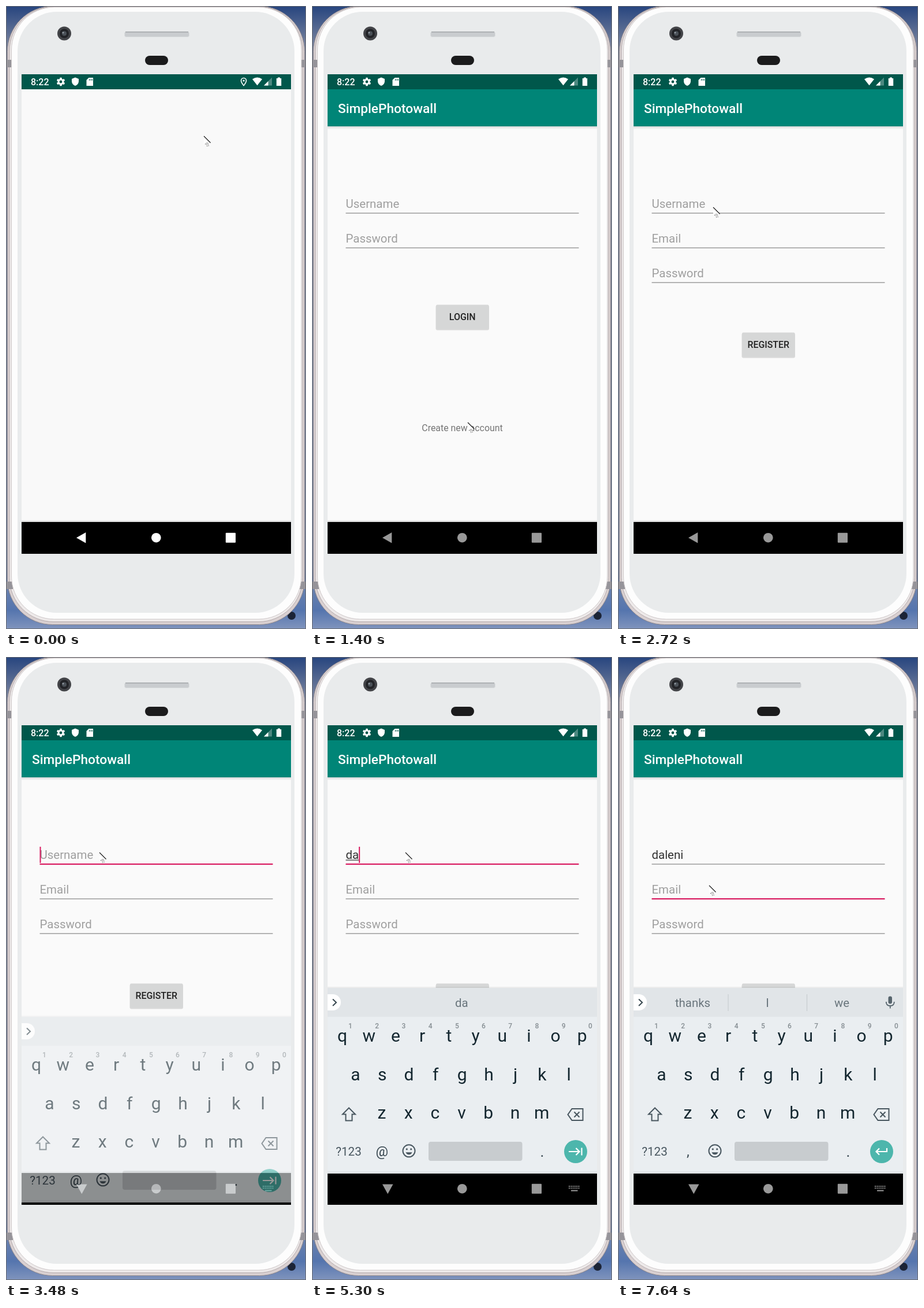
An HTML page that plays this animation: 520 px wide and 1077 px high, repeating every 8 s.

```html
<!DOCTYPE html>
<html lang="en">
<head>
<meta charset="utf-8">
<title>Sign-up screen</title>
<style>
  html, body { margin: 0; width: 100%; height: 100%; overflow: hidden; background: #5a76a8; }
  svg { display: block; width: 100vw; height: 100vh; }
  text { font-family: Roboto, sans-serif; white-space: pre; }
</style>
</head>
<body>
<svg id="stage" viewBox="0 0 520 1077" xmlns="http://www.w3.org/2000/svg"></svg>
<script>
const LOOP = 8000;
const APP = 'SimplePhotowall';
const NAME = 'daleni';
const PINK = '#d81b60', LINE = '#858585', KEY_GREY = '#48565f';
const FIELD_SIZE = 20.45;

const rect = (x, y, w, h, fill, more = '') =>
  `<rect x="${x}" y="${y}" width="${w}" height="${h}" fill="${fill}" ${more}/>`;
const path = (d, fill, more = '') => `<path d="${d}" fill="${fill}" ${more}/>`;
const stroke = (d, color, width = 2, more = '') =>
  path(d, 'none', `stroke="${color}" stroke-width="${width}" ${more}`);
const circle = (x, y, r, fill, more = '') => `<circle cx="${x}" cy="${y}" r="${r}" fill="${fill}" ${more}/>`;
const text = (x, y, s, size, fill, more = '') =>
  `<text x="${x}" y="${y}" font-size="${size}" fill="${fill}" ${more}>${s}</text>`;
const mid = 'text-anchor="middle"', medium = 'font-weight="500"';

const defs = `<defs>
  <linearGradient id="sky" x2="0" y2="1">
    <stop stop-color="#27457f"/><stop offset=".08" stop-color="#8d93a6"/>
    <stop offset=".9" stop-color="#7c8cad"/><stop offset=".97" stop-color="#5575ae"/><stop offset="1" stop-color="#8094bd"/>
  </linearGradient>
  <linearGradient id="shade" x2="0" y2="1">
    <stop stop-color="#000" stop-opacity=".14"/><stop offset="1" stop-color="#000" stop-opacity="0"/>
  </linearGradient>
  <clipPath id="screen"><rect x="27" y="118" width="467" height="829"/></clipPath>
  <clipPath id="reveal"><rect id="revealBox" x="27" y="118" width="467" height="829"/></clipPath>
</defs>`;

function phone() {
  const bands = [93, 995].map(y => rect(0, y, 12, 13, '#96949a') + rect(508, y, 12, 13, '#96949a')).join('');
  return rect(0, 0, 520, 1077, 'url(#sky)') +
    rect(368, 0, 12, 4, '#4a4a50') +
    circle(495, 1054, 7, '#1c2436') +
    rect(2.5, .5, 515, 1069, '#d9d0d1', 'rx="78" stroke="#8e888d"') +
    rect(6, 1.5, 508, 1063, '#eeeaea', 'rx="76" stroke="#b3a9ab"') + bands +
    rect(9.5, 2, 502.5, 1058, '#fdfdfd', 'rx="74" stroke="#cfc9ca"') +
    rect(20, 10, 480, 1039, '#e9ebec', 'rx="68"') +
    circle(101, 47.5, 12, '#434448') + circle(101, 47.5, 8, '#222327') +
    circle(101, 47.5, 4, '#4a5057') + circle(99, 46, 1.5, '#9299a0') +
    rect(205.5, 44.5, 112, 9, '#c9cccf', 'rx="3" stroke="#dcdfe0"') + rect(207, 44, 109, 2, '#aeb1b4') +
    rect(241, 86, 40, 16, '#1b1b1c', 'rx="8"') +
    rect(.5, .5, 519, 1076, 'none', 'stroke="#6b6d72"');
}

const field = (y, label, id = '') =>
  text(58.5, y - 9, label, FIELD_SIZE, '#9f9f9f', id && `id="${id}Hint"`) +
  rect(58.5, y - .5, 404, 1.2, LINE, id && `id="${id}Line"`);

const button = (y, label) =>
  rect(214.5, y + 1, 92.5, 43, '#000', 'rx="3" opacity=".13"') +
  rect(215, y, 91.5, 42, '#d6d7d7', 'rx="2"') +
  text(260.7, y + 26.8, label, 15.9, '#222', `${mid} ${medium}`);

const appWindow = content =>
  rect(27, 144, 467, 748, '#fafafa') + rect(27, 889.5, 467, 2.5, '#e2e2e2') +
  rect(27, 208, 467, 5, 'url(#shade)') +
  rect(27, 78, 467, 66, '#00574b') + rect(27, 144, 467, 64, '#008577') +
  text(45, 185, APP, 22.7, '#fff', medium) + content;

const login = appWindow(
  field(358, 'Username') + field(418, 'Password') + button(516.5, 'LOGIN') +
  text(260.5, 734.5, 'Create new account', 15.9, '#757575', mid));

const register = appWindow(
  field(358, 'Username', 'user') + field(418, 'Email', 'mail') + field(478, 'Password') +
  button(564.5, 'REGISTER') +
  text(58.5, 349, '', FIELD_SIZE, '#303030', 'id="typed"') +
  rect(58.5, 350.5, 0, 1.2, '#303030', 'id="composing"') +
  rect(58.5, 328, 2, 28, PINK, 'id="caret"'));

function statusIcons() {
  const teeth = [0, 60, 120].map(a => rect(93.2, 123.7, 3.6, 14.6, '#fff', `rx="1" transform="rotate(${a} 95 131)"`)).join('');
  return text(43, 137, '8:22', 16, '#fff', medium) +
    teeth + circle(95, 131, 5.4, '#fff') + circle(95, 131, 2.4, '#00574b') +
    path('M120 123.5l6 2.5v4.500q-.5 5.500-6 7.500q-5.500-2-6-7.500v-4.500z', '#fff') +
    path('M143.500 124h7.500v14h-11.500v-10z', '#fff') +
    stroke('M144.500 126v3M147 126v3M149.300 126v3', '#00574b', 1) +
    `<g id="pin">${stroke('M412 137.500q-4.500-5.500-4.500-8.500a4.500 4.500 0 0 1 9 0q0 3-4.500 8.500z', '#fff', 1.6)}${circle(412, 129, 1.6, '#fff')}</g>` +
    path('M427 126.500q8.500-6 17 0l-8.500 10.800z', '#fff') +
    path('M461 123.500v14h-14z', '#fff', 'opacity=".3"') + path('M454.500 130v7.500h-7.500z', '#fff') +
    path('M471 123.500h4v1.500h2.200v13h-8.400v-13h2.200z', '#fff');
}

function navIcons() {
  const dots = [0, 1, 2, 3, 4, 5].map(i =>
    rect(445 + i * 3.3, 914, 1.9, 1.9, '#fff') + rect(445 + i * 3.3, 917.300, 1.9, 1.9, '#fff')).join('');
  return path('M122 919.300L138.300 910v18.500z', '#fff', 'id="back"') +
    circle(260.3, 919.2, 8.3, '#fff') + rect(380.8, 910.8, 17.2, 17, '#fff', 'rx="1"') +
    `<g id="imeIcon">${dots}${rect(449, 921.5, 11.5, 2, '#fff')}</g>`;
}

function keyboard() {
  const row = (letters, x, y) => [...letters].map((c, i) => text(x + i * 46.2, y, c, 30, '#13262f', mid)).join('');
  const hints = [...'1234567890'].map((c, i) => text(66.5 + i * 46.2, 642, c, 12, '#858d92', `${mid} ${medium}`)).join('');
  const word = (x, s) => text(x, 605, s, 20.4, '#69757c', mid);
  return rect(27, 570, 467, 2, '#000', 'opacity=".05"') +
    rect(27, 572, 467, 321, '#eaeef1') + rect(27, 572, 467, 50, '#e1e5e8') +
    rect(27, 889.5, 467, 3, '#dfe3e5') +
    path('M27 583h9a14 14 0 0 1 0 28h-9z', '#fff') +
    stroke('M36 591.500l6 5.700l-6 5.700', '#37474f') +
    text(259.3, 605, '', 20.4, '#69757c', `id="guess" ${mid}`) +
    `<g id="words">${word(129.500, 'thanks')}${word(259, 'I')}${word(388, 'we')}
      ${rect(190.500, 583, 1, 29, '#c3c9cc')}${rect(327, 583, 1, 29, '#c3c9cc')}
      ${rect(468.500, 586.500, 6.500, 13, '#56646c', 'rx="3.2"')}
      ${stroke('M464.800 596q0 7 7 7t7-7M471.800 603v4.500', '#56646c', 1.800)}</g>` +
    row('qwertyuiop', 52.5, 665) + hints + row('asdfghjkl', 75.5, 732) + row('zxcvbnm', 121, 798) +
    stroke('M64 779.500l11 11h-5.500v11h-11v-11h-5.500z', KEY_GREY) +
    stroke('M450.500 781h19v20h-19l-7-10zM454.500 786.500l9 9M463.500 786.500l-9 9', KEY_GREY) +
    text(63.5, 861.5, '?123', 20.6, KEY_GREY, mid) +
    text(121.3, 863, '@', 24, '#37464f', `id="sideKey" ${mid}`) +
    circle(168, 853.8, 10.5, 'none', `stroke="${KEY_GREY}" stroke-width="2"`) +
    circle(164.300, 850.800, 1.600, KEY_GREY) + circle(171.700, 850.800, 1.600, KEY_GREY) +
    path('M162.500 856.300h11q-1.500 4-5.500 4t-5.500-4z', KEY_GREY) +
    rect(202, 838, 162.5, 33, '#c8cccf', 'rx="4"') +
    text(399, 864, '.', 26, '#37464f', mid) +
    circle(457, 855, 20, '#4db6ac') +
    stroke('', '#fff', 2.2, 'id="action"');
}

function pointer() {
  const dots = [[2, 13], [4, 11.5], [6, 11.5], [4.5, 14], [7, 13.5], [5, 16.5], [7.5, 16]]
    .map(([x, y]) => rect(x, y, 1.1, 1.1, '#333')).join('');
  return path('M0 0v15l4-3 3 6 2.500-1-2-5.500h4z', '#fff') + stroke('M0 0l11.500 11.500', '#111', 1.1) + dots;
}

const stage = document.getElementById('stage');
stage.innerHTML = defs + phone() + `<g clip-path="url(#screen)">
  ${rect(27, 118, 467, 829, '#000')}
  <g id="blank">${rect(27, 118, 467, 26, '#00574b')}${rect(27, 144, 467, 748, '#f9f9f9')}${rect(27, 889.5, 467, 2.5, '#e2e2e2')}</g>
  <g id="login">${login}${rect(27, 144, 467, 748, '#000', 'id="dim"')}</g>
  <g id="registerClip" clip-path="url(#reveal)"><g id="register">${register}</g></g>
  ${statusIcons()}
  <g id="nav">${navIcons()}</g>
  <g id="keyboard">${keyboard()}</g>
</g><g id="pointer">${pointer()}</g>`;

const el = {};
stage.querySelectorAll('[id]').forEach(node => el[node.id] = node);

// Each row: start time, then the values held from there on.
const tracks = {
  loginAlpha: [[0, 0], [270, .4], [390, 1]],
  pinAlpha: [[0, 1], [270, .6], [390, 0]],
  navAlpha: [[0, 1], [120, .98], [270, .93], [390, .87], [510, .8], [630, .73], [770, .67], [890, .62], [1010, .6]],
  // exit shift, dim, enter shift, top of the revealed part
  opening: [[0, 0, 0, 33, 947], [2180, -1, .01, 33, 780], [2300, -9, .08, 15, 213], [2450, -16, .1, 3, 138], [2570, -16, .1, 0, 118]],
  // shift, opacity
  keyboard: [[0, 50, 0], [3480, 50, .6], [3630, 8, .94], [3750, 0, 1]],
  caret: [[0, 0], [3240, 1], [3750, 0], [4340, 1], [4740, 0], [4990, 1], [6260, 0], [6800, 1], [7640, 0]],
  typed: [[0, 0], [4990, 1], [5300, 2], [5420, 4], [5670, 5], [5820, 6]],
  pointer: [[0, 343, 225], [270, 340, 275], [390, 331, 345], [510, 318, 420], [630, 302, 483],
    [770, 281, 545], [890, 267, 592], [1010, 261, 625], [1160, 263, 662], [1280, 267, 698], [1400, 270, 720],
    [2180, 264, 698], [2300, 248, 646], [2450, 196, 470], [2570, 169, 365], [2720, 165, 348], [2840, 162, 338],
    [6380, 161, 369], [6530, 159, 384], [6650, 158, 392], [6800, 158, 395]]
};

const at = (name, t) => tracks[name].findLast(row => row[0] <= t).slice(1);
const set = (node, attrs) => Object.entries(attrs).forEach(([k, v]) => node.setAttribute(k, v));
const show = (node, on) => node.setAttribute('visibility', on ? 'inherit' : 'hidden');
const move = (node, x, y) => node.setAttribute('transform', `translate(${x} ${y})`);
const write = (node, s) => { if (node.textContent !== s) node.textContent = s; };

function focusLine(node, y, on) {
  set(node, { y: on ? y - 1 : y - .5, height: on ? 2.2 : 1.2, fill: on ? PINK : LINE });
}

function draw(t) {
  set(el.login, { opacity: at('loginAlpha', t) });
  set(el.pin, { opacity: at('pinAlpha', t) });
  set(el.nav, { opacity: at('navAlpha', t) });

  const [exitY, dim, enterY, top] = at('opening', t);
  move(el.login, 0, exitY);
  set(el.dim, { opacity: dim });
  move(el.register, 0, enterY);
  set(el.revealBox, { y: top, height: 947 - top });
  show(el.registerClip, t >= 2180);

  const [keysY, keysAlpha] = at('keyboard', t);
  move(el.keyboard, 0, keysY);
  set(el.keyboard, { opacity: keysAlpha });
  const keysUp = t >= 3480;
  set(el.back, { d: keysUp ? 'M122 911.500h18.500l-9.250 16.800z' : 'M122 919.300L138.300 910v18.500z' });
  show(el.imeIcon, keysUp);

  const onMail = t >= 7240;
  const word = NAME.slice(0, at('typed', t)[0]);
  write(el.typed, word);
  write(el.guess, onMail ? '' : word);
  show(el.userHint, !word);
  const width = word ? el.typed.getComputedTextLength() : 0;
  set(el.composing, { width: onMail ? 0 : width });
  set(el.caret, { x: 58.5 + (onMail ? 0 : width), y: onMail ? 388 : 328 });
  show(el.caret, at('caret', t)[0]);
  focusLine(el.userLine, 358, t >= 3240 && !onMail);
  focusLine(el.mailLine, 418, t >= 7090);

  show(el.words, onMail);
  write(el.sideKey, onMail ? ',' : '@');
  set(el.action, { d: onMail
    ? 'M466 849v6h-18M453 849.500l-5.500 5.500l5.500 5.500'
    : 'M445 855h18M457.500 849l6 6l-6 6M467.500 848.500v13' });

  move(el.pointer, ...at('pointer', t));
}

function tick() {
  draw(performance.now() % LOOP);
  requestAnimationFrame(tick);
}
tick();
</script>
</body>
</html>
```
